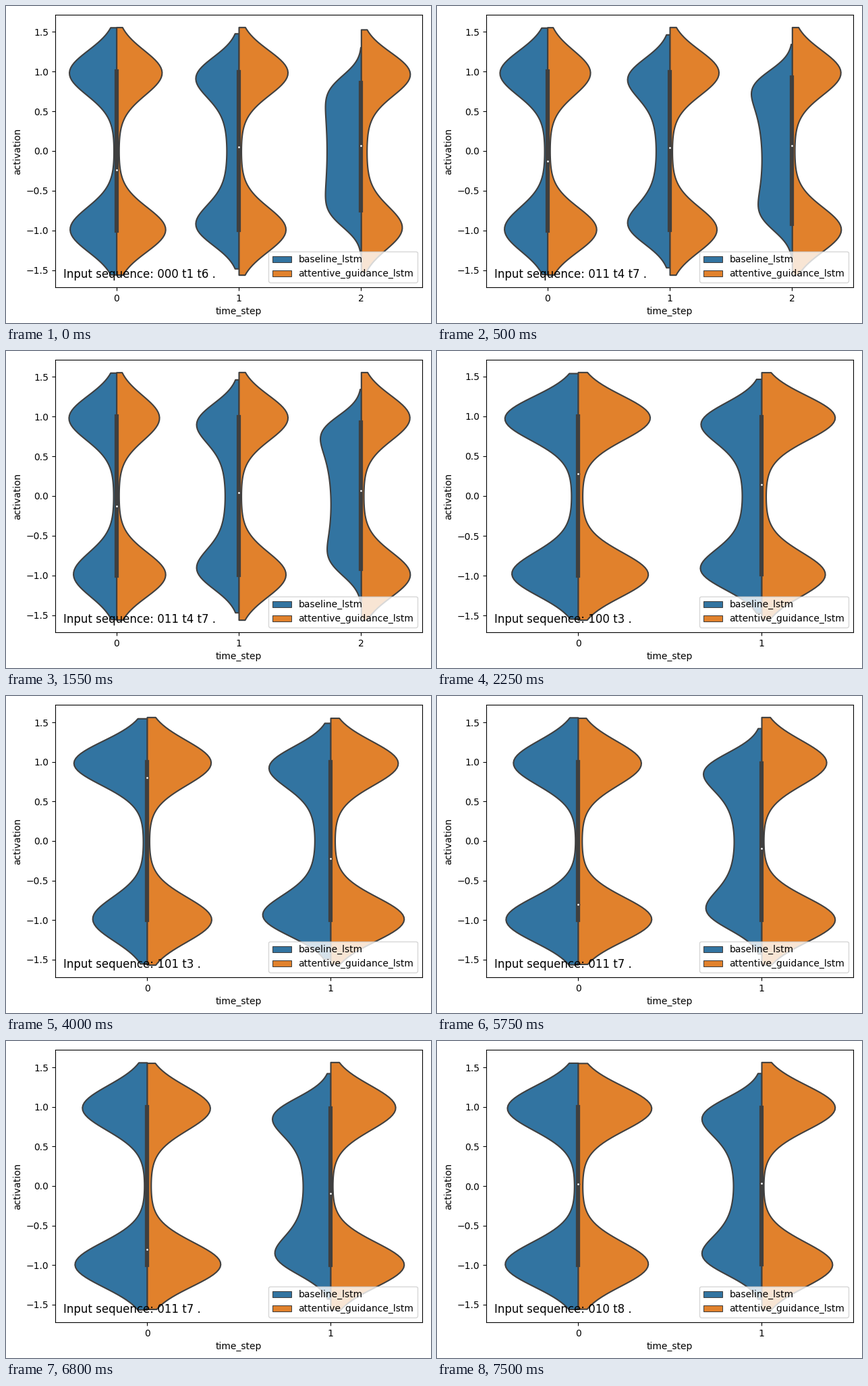
These frames come from a looping animation (630x470 px, 8000 ms). A matplotlib script:

```python
import numpy as np
import matplotlib.pyplot as plt
from matplotlib.animation import FuncAnimation
from matplotlib.patches import Patch

WIDTH, HEIGHT, DPI = 630, 470, 100
LEFT, RIGHT, TOP, BOTTOM = 73, 617, 13, 417
INTERVAL, FRAMES = 250, 32
BLUE, ORANGE, GRAY = "#3274a1", "#e1812c", "#3f3f3f"
LINE = 1.5
UNITS = 500  # sample size that sets the kernel bandwidth

# Normally distributed inputs, squashed by tanh into activations.
Z = np.linspace(-3, 3, 601)
MASS = np.exp(-Z ** 2 / 2)
MASS /= MASS.sum()


class Activations:
    """tanh(gain * (z + tilt)): gain saturates, tilt favours one sign."""

    def __init__(self, gain, tilt):
        self.values = np.tanh(gain * (Z + tilt))
        mean = MASS @ self.values
        spread = np.sqrt(MASS @ (self.values - mean) ** 2)
        self.bandwidth = spread * UNITS ** -0.2
        self.low = self.values.min() - 2 * self.bandwidth
        self.high = self.values.max() + 2 * self.bandwidth

    def density(self):
        y = np.linspace(self.low, self.high, 100)
        d = (y[:, None] - self.values) / self.bandwidth
        kernel = np.exp(-d ** 2 / 2) / (self.bandwidth * np.sqrt(2 * np.pi))
        return y, kernel @ MASS


def quartiles(pair):
    """Quartiles of both samples taken together."""
    values = np.concatenate([half.values for half in pair])
    order = np.argsort(values)
    share = np.cumsum(np.tile(MASS / 2, 2)[order])
    return np.interp([0.25, 0.5, 0.75], share, values[order])


# Per time step: (gain, tilt) of the baseline and of the guided model.
SCENES = [
    ("000 t1 t6 .", [((11.7, 0.009), (13.6, -0.045)),
                     ((2.46, 0), (14, 0.025)),
                     ((0.8, 0), (5.3, 0.1))]),
    ("011 t4 t7 .", [((10, 0.058), (13, -0.08)),
                     ((2.15, 0), (14, 0.025)),
                     ((0.95, 0.09), (13.5, -0.005))]),
    ("100 t3 .", [((6.9, 0.057), (11, 0.016)),
                  ((2.2, -0.005), (10.6, 0.085))]),
    ("101 t3 .", [((10.6, 0.174), (20, -0.005)),
                  ((2.8, -0.05), (11, -0.05))]),
    ("011 t7 .", [((17, -0.065), (12, -0.09)),
                  ((1.52, 0.02), (24, -0.075))]),
    ("010 t8 .", [((13, -0.018), (11, 0.028)),
                  ((1.55, 0), (26, 0.022))]),
]

plt.rcParams.update({"font.family": "DejaVu Sans", "font.size": 10})
fig = plt.figure(figsize=(WIDTH / DPI, HEIGHT / DPI), dpi=DPI)
ax = fig.add_axes([LEFT / WIDTH, 1 - BOTTOM / HEIGHT,
                   (RIGHT - LEFT) / WIDTH, (BOTTOM - TOP) / HEIGHT])


def draw_violin(x, pair):
    shapes = [half.density() for half in pair]
    peak = max(density.max() for _, density in shapes)
    for (y, density), color, side in zip(shapes, (BLUE, ORANGE), (-1, 1)):
        ax.fill_betweenx(y, x, x + side * 0.4 * density / peak,
                         facecolor=color, edgecolor=GRAY, linewidth=LINE)
    lower, median, upper = quartiles(pair)
    ax.plot([x, x], [lower, upper], color=GRAY, linewidth=3 * LINE)
    ax.scatter(x, median, s=(2 * LINE) ** 2, color="white",
               edgecolor=GRAY, zorder=3)


def draw(frame):
    # The first scene enters 1250 ms into its 1750 ms.
    sequence, steps = SCENES[(frame * INTERVAL + 1250) // 1750]
    violins = [[Activations(*half) for half in step] for step in steps]
    n = len(violins)
    ax.clear()
    for x, pair in enumerate(violins):
        draw_violin(x, pair)

    high = max(half.high for pair in violins for half in pair)
    low = min(half.low for pair in violins for half in pair)
    margin = 0.05 * (high - low)
    ax.set(xlim=(-0.5, n - 0.5), ylim=(low - margin, high + margin),
           xticks=range(n), yticks=np.arange(-1.5, 1.6, 0.5),
           xlabel="time_step", ylabel="activation")
    ax.text(0.0228, 0.035, "Input sequence: " + sequence, fontsize=12,
            transform=ax.transAxes)
    ax.legend(handles=[
        Patch(facecolor=color, edgecolor=GRAY, linewidth=LINE / 2, label=label)
        for color, label in ((BLUE, "baseline_lstm"),
                             (ORANGE, "attentive_guidance_lstm"))
    ], loc="lower right")
    return []


anim = FuncAnimation(fig, draw, frames=FRAMES, interval=INTERVAL, repeat=True,
                     init_func=lambda: draw(0))
plt.show()
```
